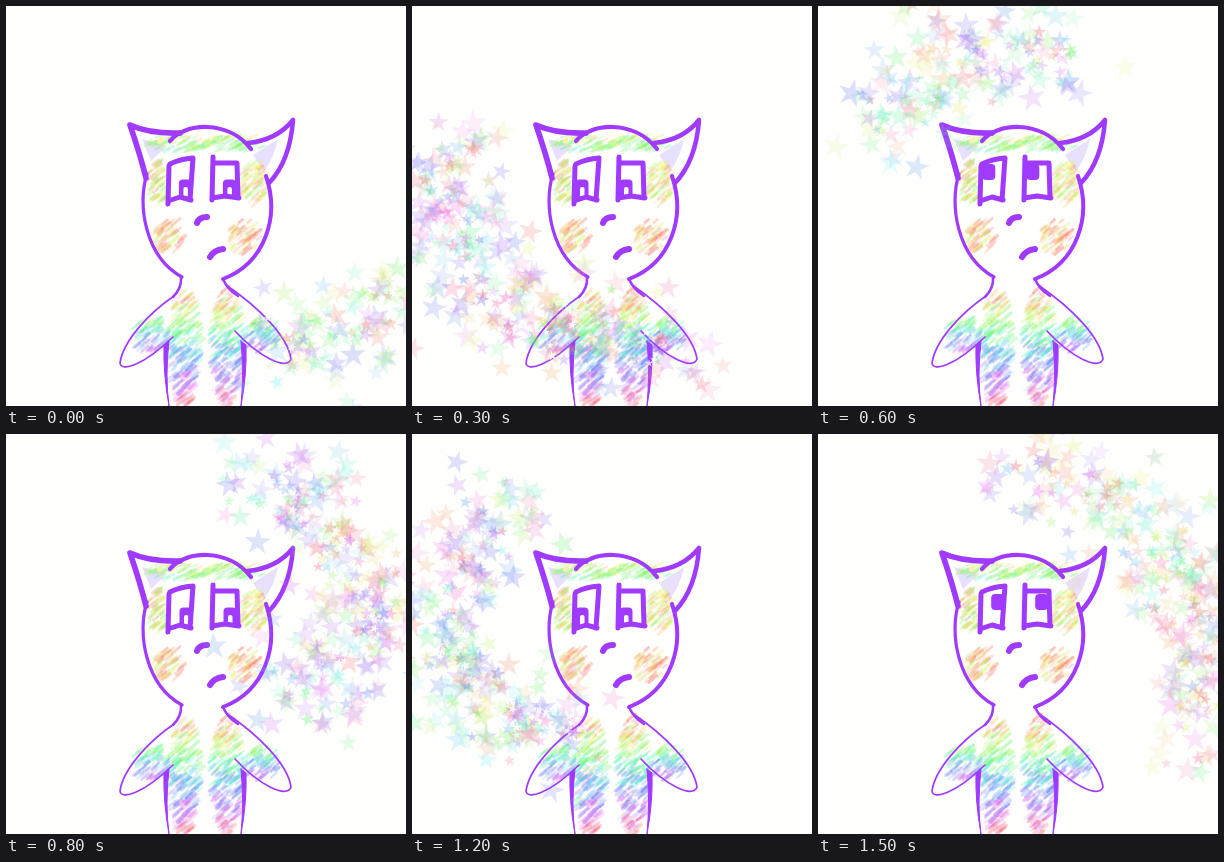
Animation, 400 px wide and 400 px high, one loop 1600 ms. Source, as an HTML page:

```html
<!DOCTYPE html>
<html lang="en">
<head>
<meta charset="utf-8">
<title>Star trail</title>
<style>
html, body { margin: 0; width: 100%; height: 100%; overflow: hidden; background: #fefefd; }
svg { display: block; width: 100vw; height: 100vh; }
</style>
</head>
<body>
<svg viewBox="0 0 400 400" fill="none" stroke-linecap="round" stroke-linejoin="round">
  <rect width="400" height="400" fill="#fefefd"/>
  <g fill="#e8e0fd">
    <path d="M136 133L161 140Q152 148 145 155Z"/>
    <path d="M247 149L272 133Q268 152 258 165Z"/>
  </g>
  <g id="hatch"></g>
  <g fill="#fefefd">
    <path d="M165 156L187 152L185 194L162 197Z"/>
    <path d="M207 156L231 157L232 191L206 193Z"/>
  </g>
  <g id="pupils"></g>
  <g stroke="#a03aff">
    <g stroke-width="5">
      <path d="M140 172Q134 148 124 119Q144 128 174 127" stroke-width="5.6"/>
      <path d="M242 137Q271 134 287 114Q284 155 263 177" stroke-width="4.5"/>
      <path d="M163 160L162 198M164 158Q174 153 187 152L184 194M162 195L174 191L185 194"/>
      <path d="M207 151L206 194M208 157L231 157L232 192M206 192L219 190L233 192"/>
      <path d="M191 217Q193 211 201 211M204 251Q208 244 217 243" stroke-width="6"/>
    </g>
    <path d="M164 135C178 117 222 113 245 143" stroke-width="4.2"/>
    <path d="M141 168C131 198 139 251 176 271" stroke-width="3.2"/>
    <path d="M260 170C274 211 259 257 217 273" stroke-width="4"/>
    <g stroke-width="1.7">
      <path d="M175 271Q176 282 167 291M217 273Q221 283 232 290" stroke-width="2.5"/>
      <path d="M168 290C143 307 117 335 114 357C115 366 137 360 167 331"/>
      <path d="M220 279C254 302 282 331 285 353C281 365 253 351 229 325"/>
    </g>
    <path d="M158 339L163 335Q159 370 163 400Q157 367 158 339ZM235 335L240 339Q241 368 235 400Q238 367 235 335Z" fill="#a03aff" stroke-width="1"/>
  </g>
  <g id="trail"></g>
</svg>
<script>
const STEPS = 16, STEP_MS = 100, LOOP = STEPS * STEP_MS, TURN = 2 * Math.PI;
const el = id => document.getElementById(id);
const fix = (n, digits = 1) => n.toFixed(digits);
const clamp = (v, lo, hi) => Math.min(hi, Math.max(lo, v));
const bump = (v, mid, width) => Math.exp(-(((v - mid) / width) ** 2));

function seeded(seed) {
  let s = seed * 7919 + 17;
  return () => {
    s = (s + 0x6d2b79f5) | 0;
    let t = Math.imul(s ^ (s >>> 15), 1 | s);
    t = (t + Math.imul(t ^ (t >>> 7), 61 | t)) ^ t;
    return ((t ^ (t >>> 14)) >>> 0) / 4294967296;
  };
}

// Crayon shading; each zone is mirrored about the middle of the figure
const zones = [
  { x: 172, y: 137, w: 32, h: 9, hue: 60, shift: 70 },
  { x: 152, y: 177, w: 13, h: 21, hue: 65, shift: 0 },
  { x: 162, y: 230, w: 15, h: 17, hue: 35, shift: 0 },
  { x: 179, y: 341, w: 16, h: 59, hue: 10, shift: 340 },
  { x: 144, y: 328, w: 18, h: 18, hue: 90, shift: 190 }
];

function hatch() {
  const rnd = seeded(5);
  let out = "";
  for (const { x, y, w, h, hue, shift } of zones) {
    for (let i = Math.round(w * h * 0.6); i > 0; i--) {
      const a = rnd() * TURN, r = Math.sqrt(rnd()), side = i % 2 ? 1 : -1;
      const px = 200 + side * (x + w * r * Math.cos(a) - 200);
      const fy = r * Math.sin(a), py = y + h * fy;
      const len = 1.5 + rnd() * 2.5, rise = len * (y < 160 ? 0.45 : 0.85);
      const tint = hue + shift * (fy + 1) / 2 + (rnd() - 0.5) * 110;
      out += `<path d="M${fix(px - len)} ${fix(py + rise)}L${fix(px + len)} ${fix(py - rise)}"
        stroke="hsl(${fix(tint)} 90% 68%)" stroke-opacity="${fix(0.1 + rnd() * 0.25, 2)}" stroke-width="${fix(1.8 + rnd() * 1.4)}"/>`;
    }
  }
  return out;
}

// Two clockwise turns: wide at the lower right, dipping inward halfway
function along(u) {
  const a = TURN * (u + 0.125);
  const reach = 1 + 0.3 * (bump(u, 0, 0.1) + bump(u, 2, 0.1)) - 0.55 * bump(u, 1.08, 0.12);
  return [200 + 165 * reach * Math.cos(a), 190 + 140 * reach * Math.sin(a)];
}

const middle = step => step / 8 + 0.01 - 0.19 * Math.sqrt(Math.sin(Math.PI * step / STEPS));
const reachOf = step => 0.18 - 0.12 * bump(step, 0, 1) - 0.07 * bump(step, 6, 1.5);

const starPath = "M" + Array.from({ length: 10 }, (_, i) => {
  const a = i * TURN / 10, r = i % 2 ? 3.8 : 10;
  return fix(r * Math.sin(a)) + " " + fix(-r * Math.cos(a));
}).join("L") + "Z";

function stars(step) {
  const rnd = seeded(step + 40), mid = middle(step), half = reachOf(step);
  const bell = () => rnd() + rnd() + rnd() - 1.5;
  const scatter = ({ density, spread, size, alpha, light }) => {
    let out = "";
    for (let i = Math.round(density * 2 * half); i > 0; i--) {
      const t = rnd() * 2 - 1, [x, y] = along(mid + t * half);
      const hue = step * 67 + 90 * Math.sin(4 * t + step) + rnd() * 230;
      const turn = rnd() * 36 - 18, scale = size * (0.8 + rnd() * 0.4);
      out += `<path d="${starPath}" transform="translate(${fix(x + bell() * spread)} ${fix(y + bell() * spread)}) rotate(${fix(turn)}) scale(${fix(scale, 2)})"
        fill="hsl(${fix(hue)} 85% ${light}%)" fill-opacity="${fix(alpha * (0.65 + rnd() * 0.7), 2)}"/>`;
    }
    return out;
  };
  return `<g display="none">` +
    scatter({ density: 520, spread: 62, size: 1.22, alpha: 0.16, light: 66 }) +
    scatter({ density: 260, spread: 38, size: 0.7, alpha: 0.2, light: 60 }) +
    scatter({ density: 130, spread: 26, size: 0.45, alpha: 0.75, light: 100 }) + `</g>`;
}

// The eyes follow the middle of the trail
function pupils(step) {
  const [cx, cy] = along(middle(step));
  const x = clamp(173 + (cx - 200) * 0.045, 170, 180);
  const y = clamp(41 + cy, 166, 183), low = y > 174, h = low ? 19 : 16;
  return [0, 44].map(dx => {
    const block = `<rect x="${fix(x + dx - 6.5)}" y="${fix(y - h / 2)}" width="13" height="${h}" rx="4" fill="#a03aff"/>`;
    const gap = `<rect x="${fix(x + dx - 2)}" y="${fix(y - 2)}" width="4.5" height="11" rx="2" fill="#fefefd"/>`;
    return low ? block + gap : block;
  }).join("");
}

el("hatch").innerHTML = hatch();
el("trail").innerHTML = Array.from({ length: STEPS }, (_, i) => stars(i)).join("");
const clouds = [...el("trail").children];
let shown = -1;

function render(ms) {
  const step = Math.floor((ms % LOOP) / STEP_MS);
  if (step === shown) return;
  clouds.forEach((g, i) => g.setAttribute("display", i === step ? "inline" : "none"));
  el("pupils").innerHTML = pupils(step);
  shown = step;
}

const start = performance.now();
function tick() {
  render(performance.now() - start);
  requestAnimationFrame(tick);
}
tick();
</script>
</body>
</html>
```
